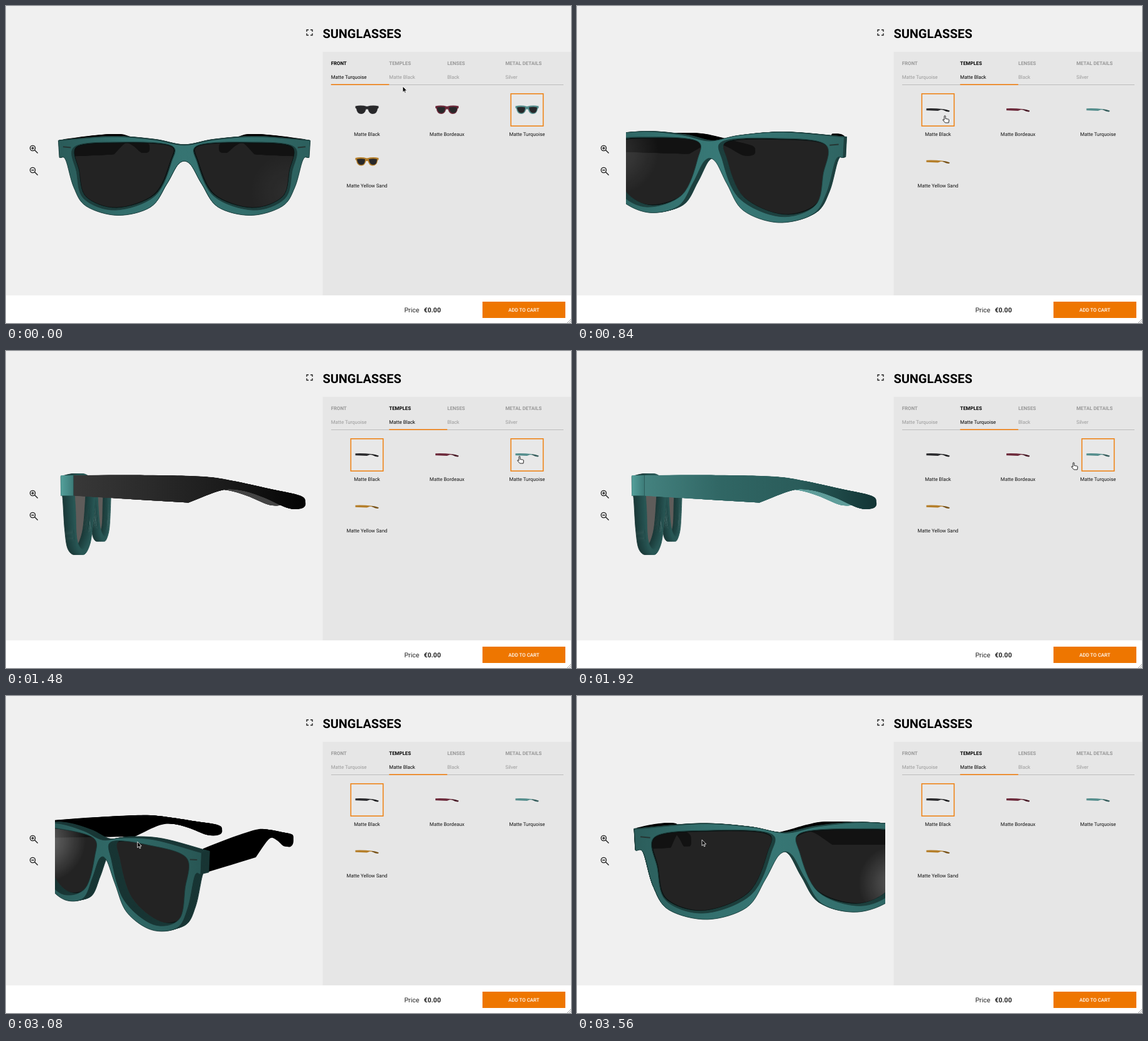
Animation, 900 px wide and 505 px high, one loop 3.6 s. Source, as an HTML page with a canvas:

```html
<!DOCTYPE html>
<html lang="en">
<head>
<meta charset="utf-8">
<title>Sunglasses configurator</title>
<style>
  html, body { margin: 0; width: 100%; height: 100%; overflow: hidden; background: #f0f0f0; }
  canvas, svg { position: absolute; left: 0; top: 0; }
  svg { font: 7.85px Roboto, sans-serif; text-rendering: geometricPrecision; }
  .bold { font-weight: 700; }
  .label { text-anchor: middle; fill: #111; }
  .line { fill: none; stroke: #222; stroke-width: 1.35; }
</style>
</head>
<body>
<canvas id="stage" width="900" height="505"></canvas>
<svg width="900" height="505" viewBox="0 0 900 505">
  <rect x="504.500" y="73" width="396" height="388" fill="#e6e6e6"/>
  <rect y="461" width="900" height="44" fill="#fff"/>
  <text x="504.500" y="51.200" class="bold" font-size="19.900">SUNGLASSES</text>
  <path class="line" d="M479 41v-3h3m3 0h3v3m0 2.500v3h-3m-3 0h-3v-3"/>
  <g class="line">
    <circle cx="42.500" cy="226.500" r="4.100"/><path d="M45.600 229.600l5 5M40.300 226.500h4.400m-2.200-2.200v4.400"/>
    <circle cx="42.500" cy="261.500" r="4.100"/><path d="M45.600 264.600l5 5M40.300 261.500h4.400"/>
  </g>
  <g font-size="10.500" fill="#222">
    <text x="634.500" y="488">Price</text><text x="665.500" y="488" class="bold">€0.00</text>
  </g>
  <rect x="759" y="471" width="132" height="26" fill="#ee7600"/>
  <text x="825" y="487.300" fill="#fff" font-size="7.900" font-weight="500" text-anchor="middle">ADD TO CART</text>
  <path d="M894 505l6-6m-3 6l3-3" stroke="#888" stroke-width=".8"/>
  <g id="panel"></g>
  <g id="cursor"></g>
</svg>
<script>
const LOOP = 3600, STEP = 40;
const ctx = document.getElementById('stage').getContext('2d');
const panel = document.getElementById('panel');
const cursor = document.getElementById('cursor');
const clamp = v => Math.max(0, Math.min(1, v));
const mix = (a, b, k) => a.map((v, i) => v + (b[i] - v) * k);
const rgb = (c, gain = 1) => `rgb(${c.map(v => Math.round(v * gain))})`;

// Timelines: each move is [start, end, destination, easing].
const linear = k => k, easeIn = k => k * k, easeOut = k => 1 - (1 - k) ** 2;
function follow(from, moves, t) {
  return moves.reduce((at, [start, end, to, ease = linear]) => mix(at, to, ease(clamp((t - start) / (end - start)))), from);
}
// Camera: yaw, pitch, zoom.
const camera = t => follow([0, .07, 1], [
  [600, 840, [.4, .037, 1.1], easeIn], [840, 1040, [Math.PI / 2, 0, 1.1], easeOut],
  [2880, 3240, [.15, .28, 1.18]], [3240, 3560, [-.24, .055, 1.18], easeOut]
], t);
const pointerAt = t => follow([632, 128], [
  [40, 160, [629, 112]], [240, 560, [585, 175]], [1120, 1480, [817, 168]], [1720, 1920, [790, 178]],
  [1920, 2280, [588, 172]], [2320, 2640, [216, 211]], [2880, 3240, [204, 249]], [3240, 3560, [199, 229]]
], t);

// The model: a mirrored front and a temple profile, in units around the orbit centre.
const FRONT_Z = 140, BACK_Z = 128, HINGE_Z = 126, EAR_X = 163, DISTANCE = 750;
const flip = ([x, y]) => [-x, y];
const halfRim = [[0, -10], [39, -17], [94, -21], [163, -16], [162, 6], [154, 9], [144, 45], [128, 70], [87, 82], [44, 71], [23, 41], [7, 14]];
const rim = [...halfRim, ...halfRim.slice(1).reverse().map(flip)];
const rimCorners = [3, 4, 19, 20];
const lensRight = [[18, -10], [84, -14], [142, -8], [140, 25], [131, 60], [90, 75], [39, 57], [17, 13]];
const lenses = [lensRight, lensRight.map(flip)];
const temple = [[126, -17], [62, -18], [-20, -17], [-60, -12], [-109, -2], [-151, 7], [-158, 16], [-154, 23],
  [-135, 23], [-102, 9], [-72, 0], [-46, 0], [-5, 15], [69, 10], [126, 6]];
const templeCorners = [0, 12, 14];

let yaw, pitch, zoom;
function project([x, y, z]) {
  const px = x * Math.cos(yaw) - z * Math.sin(yaw), depth = x * Math.sin(yaw) + z * Math.cos(yaw);
  const py = y * Math.cos(pitch) + depth * Math.sin(pitch), pz = depth * Math.cos(pitch) - y * Math.sin(pitch);
  const scale = zoom * DISTANCE / (DISTANCE - pz);
  return [284 + px * scale, 222 + py * scale];
}

// Closed smooth curve through projected points, sharp at the listed corners.
function curve(points, corners = []) {
  const p = points.map(project), n = p.length, path = new Path2D();
  const at = i => p[(i + n) % n];
  const handle = (i, dir) => corners.includes(i % n)
    ? mix(at(i), at(i + dir), 1 / 3)
    : at(i).map((v, c) => v + (at(i + dir)[c] - at(i - dir)[c]) / 6);
  path.moveTo(...p[0]);
  for (let i = 0; i < n; i++) path.bezierCurveTo(...handle(i, 1), ...handle(i + 1, -1), ...at(i + 1));
  path.closePath();
  return path;
}
const onPlane = (points, z) => points.map(([x, y]) => [x, y, z]);

function gradient(x0, x1, colors) {
  const g = ctx.createLinearGradient(x0, 0, x1, 0);
  colors.forEach((c, i) => g.addColorStop(i / (colors.length - 1), c));
  return g;
}
function glow(point, radius, alpha) {
  const [x, y] = project(point), g = ctx.createRadialGradient(x, y, 0, x, y, radius);
  g.addColorStop(0, `rgba(255,255,255,${alpha})`);
  g.addColorStop(1, 'rgba(255,255,255,0)');
  ctx.fillStyle = g;
  ctx.fillRect(0, 0, 900, 505);
}

function drawTemple(sign, teal) {
  const lit = clamp((yaw - .9) / .6);
  const shade = (black, color) => rgb(mix([black, black, black], color, teal), lit);
  ctx.fillStyle = sign < 0 ? shade(68, [95, 157, 154]) : gradient(107, 478, [
    shade(56, [68, 130, 127]), shade(42, [48, 102, 100]), shade(26, [42, 92, 90]), shade(3, [18, 52, 52])]);
  for (let inset = 8; inset >= 0; inset -= 2) {
    ctx.fill(curve(temple.map(([z, y]) => [sign * (160 - (HINGE_Z - z) * .3 - inset), y, z]), templeCorners));
  }
}

function drawFront(facing) {
  const tint = mix([0, 0, 0], [50, 108, 106], 1.06 - 1.15 * pitch);
  for (const lens of lenses) {
    const glass = curve(onPlane(lens, BACK_Z + 4));
    ctx.fillStyle = facing ? 'rgba(20,20,20,.93)' : 'rgba(70,66,64,.85)';
    ctx.fill(glass);
    ctx.save();
    ctx.clip(glass);
    if (facing) {
      glow([-140, 5, FRONT_Z], 70, clamp(yaw * .6 - .1));
      glow([135, 50, FRONT_Z], 60, clamp(.05 - yaw * .9));
    }
    ctx.strokeStyle = '#0b1414';
    ctx.lineWidth = 5;
    ctx.stroke(glass);
    ctx.restore();
  }
  // Thin slices stacked towards the viewer give the frame its thickness.
  const slices = 8;
  for (let i = 0; i <= slices; i++) {
    const k = i / slices, z = facing ? BACK_Z + (FRONT_Z - BACK_Z) * k : FRONT_Z - (FRONT_Z - BACK_Z) * k;
    const ring = curve(onPlane(rim, z), rimCorners);
    lenses.forEach(lens => ring.addPath(curve(onPlane(lens, z))));
    const [left] = project([-EAR_X, 0, z]), [right] = project([EAR_X, 0, z]);
    ctx.fillStyle = facing && i === slices
      ? gradient(left, right, [.86, 1.03, 1.1, 1.03, .9].map(gain => rgb(tint, gain)))
      : rgb(tint, facing ? .5 : .5 + .25 * k);
    ctx.fill(ring, 'evenodd');
    ctx.strokeStyle = rgb(tint, facing ? .6 : .5 + .25 * k);
    ctx.lineWidth = .9;
    ctx.stroke(ring);
  }
  if (!facing) return;
  ctx.strokeStyle = '#263634';
  ctx.lineWidth = 2;
  for (const sign of [-1, 1]) {
    ctx.beginPath();
    ctx.moveTo(...project([sign * 147, -7, FRONT_Z]));
    ctx.lineTo(...project([sign * 157, -8, FRONT_Z]));
    ctx.stroke();
  }
}

function drawHingeBlock() {
  const corners = [[FRONT_Z, -17], [HINGE_Z, -17], [HINGE_Z, 6], [FRONT_Z, 6]].map(([z, y]) => project([EAR_X, y, z]));
  ctx.beginPath();
  corners.forEach(p => ctx.lineTo(...p));
  ctx.fillStyle = gradient(corners[0][0], corners[1][0], ['#54a09b', '#3d7c79']);
  ctx.fill();
}

function drawGlasses(teal) {
  const facing = DISTANCE * Math.cos(yaw) * Math.cos(pitch) > FRONT_Z;
  ctx.clearRect(0, 0, 900, 505);
  ctx.save();
  ctx.beginPath();
  ctx.rect(78, 0, 413, 461);
  ctx.clip();
  drawTemple(-1, teal);
  if (facing) drawTemple(1, teal);
  drawFront(facing);
  if (!facing) {
    drawTemple(1, teal);
    drawHingeBlock();
  }
  ctx.restore();
}

const tabs = ['FRONT', 'TEMPLES', 'LENSES', 'METAL DETAILS'];
const names = ['Matte Black', 'Matte Bordeaux', 'Matte Turquoise', 'Matte Yellow Sand'];
const swatches = ['#2b2b2e', '#6d2a3b', '#558e8d', '#b57f2b'];
const tiles = names.map((name, i) => ({ name, x: 575 + i % 3 * 127.5, y: i < 3 ? 165.5 : 248 }));
const lensIcon = 'q7-1.500 13 0q0 9-6 9q-6 0-7-9z';
const icons = [
  color => `<path d="M-18.500-6Q-9-8 0-5.500Q9-8 18.500-6V-3L17-2Q16 6.500 9 6.500Q3.500 6.500 1.500-1H-1.500Q-3.500 6.500-9 6.500Q-16 6.500-17-2L-18.500-3Z" fill="${color}"/>
    <path d="M-16-4${lensIcon}M3-4${lensIcon}" fill="#28282a"/>`,
  color => `<path d="M-18.500-2.300Q7-3 18.500 1.200Q19 3 17 3C12 2.600 9-.8 4.500-.3L0 1.500-18.500 .8Z" fill="${color}"/>
    <path d="M8-1.300Q14-.6 18.500 1.200Q19 3 17 3Q12 2.300 8 0Z" opacity=".35"/>`
];

function drawPanel(tab, selected, [cx, cy]) {
  const values = ['Matte Turquoise', tab ? names[selected] : 'Matte Black', 'Black', 'Silver'];
  const head = tabs.map((title, i) => {
    const x = 517.7 + i * 92.6, color = i === tab ? '#000' : '#999';
    return `<g fill="${color}"><text x="${x}" y="94" class="bold">${title}</text><text x="${x}" y="116.300">${values[i]}</text></g>`;
  });
  const grid = tiles.map(({ name, x, y }, i) => {
    const hover = Math.abs(cx - x) < 26 && Math.abs(cy - y) < 26;
    const box = i === selected || hover
      ? '<rect x="-25.700" y="-25.700" width="51.400" height="51.400" fill="#e8e8e8" stroke="#ee8418" stroke-width="1.600"/>' : '';
    return `<g transform="translate(${x} ${y})">${box}${icons[tab](swatches[i])}<text y="41" class="label">${name}</text></g>`;
  });
  panel.innerHTML = `<path d="M518 125.500H888" stroke="#bcbcbc"/>
    <path d="M${517.7 + tab * 92.6} 125.200h92.600" stroke="#ee7600" stroke-width="1.500"/>` + head.join('') + grid.join('');
}

function drawCursor([x, y]) {
  const hand = x > 511 && (y > 85 && y < 125 || y > 139 && y < 210);
  cursor.setAttribute('transform', `translate(${x} ${y})`);
  cursor.innerHTML = hand
    ? '<path d="M0 .8Q0-.3 1-.3T2 .8V4.500L6.500 5.300Q7.800 5.600 7.600 7L7 11H1.500L-2.200 6.800Q-2.600 5.600-1.200 5.800L0 6.600Z" fill="#fff" stroke="#111" stroke-width=".9"/>'
    : '<path d="M0 0V9.500L2.200 7.500 3.600 10.800 5.100 10.200 3.700 6.900H6.600Z" stroke="#fff" stroke-width=".8"/>';
}

function render() {
  const t = Math.floor(performance.now() % LOOP / STEP) * STEP;
  const pointer = pointerAt(t), tab = t < 200 ? 0 : 1;
  const selected = !tab || t >= 1760 && t < 2320 ? 2 : 0;
  [yaw, pitch, zoom] = camera(t);
  drawGlasses(clamp((t - 1720) / 120) - clamp((t - 2280) / 120));
  drawPanel(tab, selected, pointer);
  drawCursor(pointer);
  requestAnimationFrame(render);
}
render();
</script>
</body>
</html>
```
